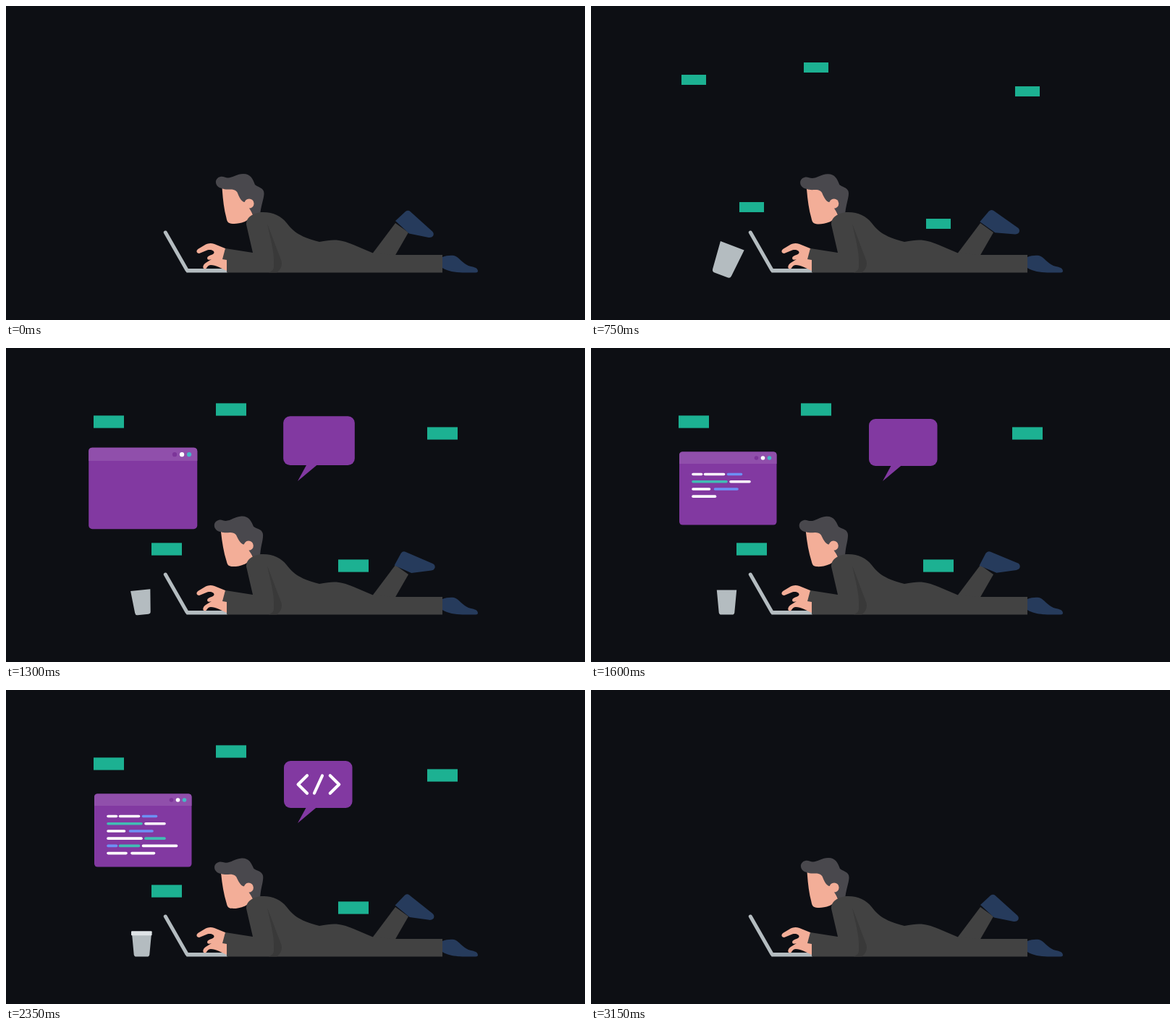
Animation of 800 by 434 pixels, one loop 3.2 s. Source, as an HTML page:

```html
<!DOCTYPE html>
<html lang="en">
<head>
<meta charset="utf-8">
<title>Working on the floor</title>
<style>
html, body { margin: 0; width: 100%; height: 100%; overflow: hidden; background: #0d0f14; }
svg { display: block; width: 100vw; height: 100vh; }
</style>
</head>
<body>
<svg viewBox="0 0 800 434" preserveAspectRatio="none">
  <g id="tiles" fill="#1cb192"></g>

  <g id="window">
    <rect x="122" y="143.5" width="134.5" height="101" rx="4.5" fill="#8239a1"/>
    <path d="M122 160V148Q122 143.5 126.5 143.5H252Q256.5 143.5 256.5 148V160Z" fill="#904fab"/>
    <circle cx="228.5" cy="152" r="2.8" fill="#7c3599"/>
    <circle cx="237.5" cy="152" r="2.8" fill="#fff"/>
    <circle cx="246.5" cy="152" r="2.8" fill="#45b8c6"/>
    <g id="code" stroke-width="3.6" stroke-linecap="round"></g>
  </g>

  <g id="bubble">
    <rect x="384" y="98" width="94.5" height="65" rx="9" fill="#8239a1"/>
    <path d="M415.500 161L403 184L430.500 161Z" fill="#8239a1"/>
    <g fill="none" stroke="#fff" stroke-width="4.2" stroke-linecap="round" stroke-linejoin="round">
      <path id="left" d="M6.200 -12.200L-6.200 0L6.200 12.200"/>
      <path id="slash" d="M5.500 -12L-5.500 12"/>
      <path id="right" d="M-6.200 -12.200L6.200 0L-6.200 12.200"/>
    </g>
  </g>

  <g id="drink">
    <path id="straw" d="M187.500 335V323.500Q187.500 321 190 320L196 316.800" fill="none" stroke="#b4bcc0" stroke-width="1.900" stroke-linecap="round"/>
    <path id="cup" d="M173.800 334.500H201.200L198.300 365.500Q198 368.600 195 368.600H180Q177 368.600 176.700 365.500Z" fill="#b4bcc0"/>
    <rect id="lid" x="173" y="333.200" width="28.600" height="6" rx="1" fill="#dfe4e7"/>
  </g>

  <g id="head">
    <path d="M298.500 250H320L331 266L338 281L342 291L330 298C322 301 316 301.300 311 300.700C306 300 305.300 297 304.500 293C301 280 299.500 266 298.500 250Z" fill="#f3ae98"/>
    <path d="M298 252C293 251 289.300 247 290 242C291.300 236 298 234.500 302 236.500C311 240 317 232 328 232C338 232 341 239 344 247C348 251 357 250.500 356.500 260C356 268 352 276 351 290L343 291L337 281L331 271C325 272 321.500 262 319.500 257.500C316 252 309 254 304 253.500C301 253 299 252.500 298 252Z" fill="#49484d"/>
    <circle cx="336" cy="273" r="6.600" fill="#f3ae98"/>
  </g>

  <path d="M220.300 313L250 365" stroke="#b4bcc0" stroke-width="5" stroke-linecap="round"/>
  <path d="M247.500 363H306V368.500H249.500Z" fill="#b4bcc0"/>
  <path d="M304 335.500L288 329C283 327 279 328 276 329.500L266 335.500C262 337.800 263 342 267 342L278 337.500C283 336 288 338 287.500 341C287 344 281 344 278.500 347C277 350 280 352 284 350L276 355C271.500 358 271 363 275 363.500C278 363 278 358 283 358C290 358 296 362 305 366V350Z" fill="#f3ae98"/>

  <path d="M603 347C608 345 614 344.300 619 345C626 347 631 356 639 359C646 361 651 361 652 366Q652 368.500 649 368.500H631C620 368 611 367 603 362Z" fill="#263b5c"/>
  <path d="M505 344L538 300L556 313L537 346Z" fill="#424242"/>
  <path id="shoe" d="M538 297L552 284Q555.500 281.500 558.500 284L589 311.500Q592 314.500 590 318Q588 320.500 584 320L557 314.500Z" fill="#263b5c"/>
  <path d="M305 368.500V351L299 350L303 335L341 341L332 302C331.500 294 338 287 352 285C368 284 380 290 387 299C396 310 402 318 433 326C455 321.500 463 323 480 330L507 341.500L538 344H603V368.500Z" fill="#424242"/>
  <path d="M361 301C366 325 371 340 370 358C371 364 367 367 363 368.500H374C381 364 382 356 380 351Z" fill="#393939"/>
</svg>

<script>
const LOOP = 3200, STEP = 50;
const WHITE = "#fff", BLUE = "#6d90f5", TEAL = "#41bdb4";
const $ = id => document.getElementById(id);

function add(parent, tag, attrs) {
  const el = document.createElementNS("http://www.w3.org/2000/svg", tag);
  for (const name in attrs) el.setAttribute(name, attrs[name]);
  return parent.appendChild(el);
}

const tiles = [[142, 102], [311, 85], [603, 118], [222, 278], [480, 301]].map(([x, y]) => ({
  x, y, el: add($("tiles"), "rect", { x: x - 21, y: y - 8.6, width: 42, height: 17.2 })
}));

// Each entry is start, end and colour; every array is a row of code.
const rows = [
  [[141, 152.5, WHITE], [157.5, 183.5, WHITE], [189.5, 207.5, BLUE]],
  [[141, 187, TEAL], [193, 219, WHITE]],
  [[141, 163.5, WHITE], [171.5, 202, BLUE]],
  [[141, 187, WHITE], [193, 219, TEAL]],
  [[141, 152.5, BLUE], [157.5, 183.5, TEAL], [189.5, 235.5, WHITE]],
  [[141, 166, WHITE], [174, 204.5, WHITE]]
];
const lines = rows.flatMap((row, i) => row.map(([from, to, stroke]) => {
  const y = 174.5 + i * 10.22;
  return { i, from, to, el: add($("code"), "line", { x1: from, y1: y, y2: y, stroke }) };
}));

const clamp = v => Math.max(0, Math.min(1, v));
const smooth = u => u * u * (3 - 2 * u);

// Eased value between [time, value] pairs.
function key(t, pairs) {
  let [t0, v0] = pairs[0];
  for (const [t1, v1] of pairs) {
    if (t < t1) return t <= t0 ? v0 : v0 + (v1 - v0) * smooth((t - t0) / (t1 - t0));
    [t0, v0] = [t1, v1];
  }
  return v0;
}

// Scale and turn about a point, then shift.
function pose(el, cx, cy, scale, turn = 0, dx = 0, dy = 0) {
  el.setAttribute("visibility", scale > 0.005 ? "inherit" : "hidden");
  el.setAttribute("transform",
    `translate(${cx + dx} ${cy + dy}) rotate(${turn}) scale(${scale}) translate(${-cx} ${-cy})`);
}

function place(el, x, y, scale) {
  el.setAttribute("visibility", scale > 0.005 ? "inherit" : "hidden");
  el.setAttribute("transform", `translate(${x} ${y}) scale(${scale})`);
}

function draw(t) {
  const stay = key(t, [[2950, 1], [3150, 0]]);

  const grow = 1 - (1 - clamp((t - 430) / 940)) ** 4;
  for (const { el, x, y } of tiles) pose(el, x, y, grow * stay);

  pose($("window"), 189.3, 194, stay * key(t, [[760, 0], [1110, 1.32], [1430, 1]]));
  for (const { i, from, to, el } of lines) {
    const edge = 139 + 100 * clamp((t - 1340 - i * 65) / 200);
    el.setAttribute("x2", Math.min(to, Math.max(from, edge)));
    el.setAttribute("visibility", edge > from ? "inherit" : "hidden");
  }

  pose($("bubble"), 403, 184, stay * key(t, [[780, 0], [1060, 1.17], [1420, 1]]));
  const open = 1 - (1 - clamp((t - 1850) / 350)) ** 2;
  place($("left"), 431.5 - 21.7 * open, 130.5, open ** 0.45);
  place($("right"), 431.5 + 22.5 * open, 130.5, open ** 0.45);
  place($("slash"), 431.5, 130.5, key(t, [[1600, 0], [1850, 1.15], [2050, 1]]));

  pose($("drink"), 187.5, 351.5, stay);
  pose($("cup"), 187.5, 351.5,
    key(t, [[480, 0], [750, 1.28], [1050, 1.05], [1300, 1]]),
    key(t, [[480, 60], [750, 21], [1000, -24], [1300, -6], [1450, 0]]));
  pose($("lid"), 187.3, 336.2,
    key(t, [[1680, 0], [1850, 1.12], [2050, 1]]), 0, 0,
    key(t, [[1680, -14], [1850, -8], [2050, 0]]));
  const fall = key(t, [[2400, 1], [2750, 0]]);
  pose($("straw"), 190, 325, t >= 2450 ? 1 : 0, -50 * fall, -38 * fall, -94 * fall);

  pose($("head"), 340, 290, 1,
    key(t, [[250, 0], [1500, -2.8], [1950, -2.7], [2900, -1.7], [3150, 0]]));
  pose($("shoe"), 548, 303, 1, key(t, [[250, 0], [1500, -20], [2650, 0]]));
}

const start = performance.now();
function tick() {
  const t = (performance.now() - start) % LOOP;
  draw(Math.floor(t / STEP) * STEP);
  requestAnimationFrame(tick);
}
tick();
</script>
</body>
</html>
```
